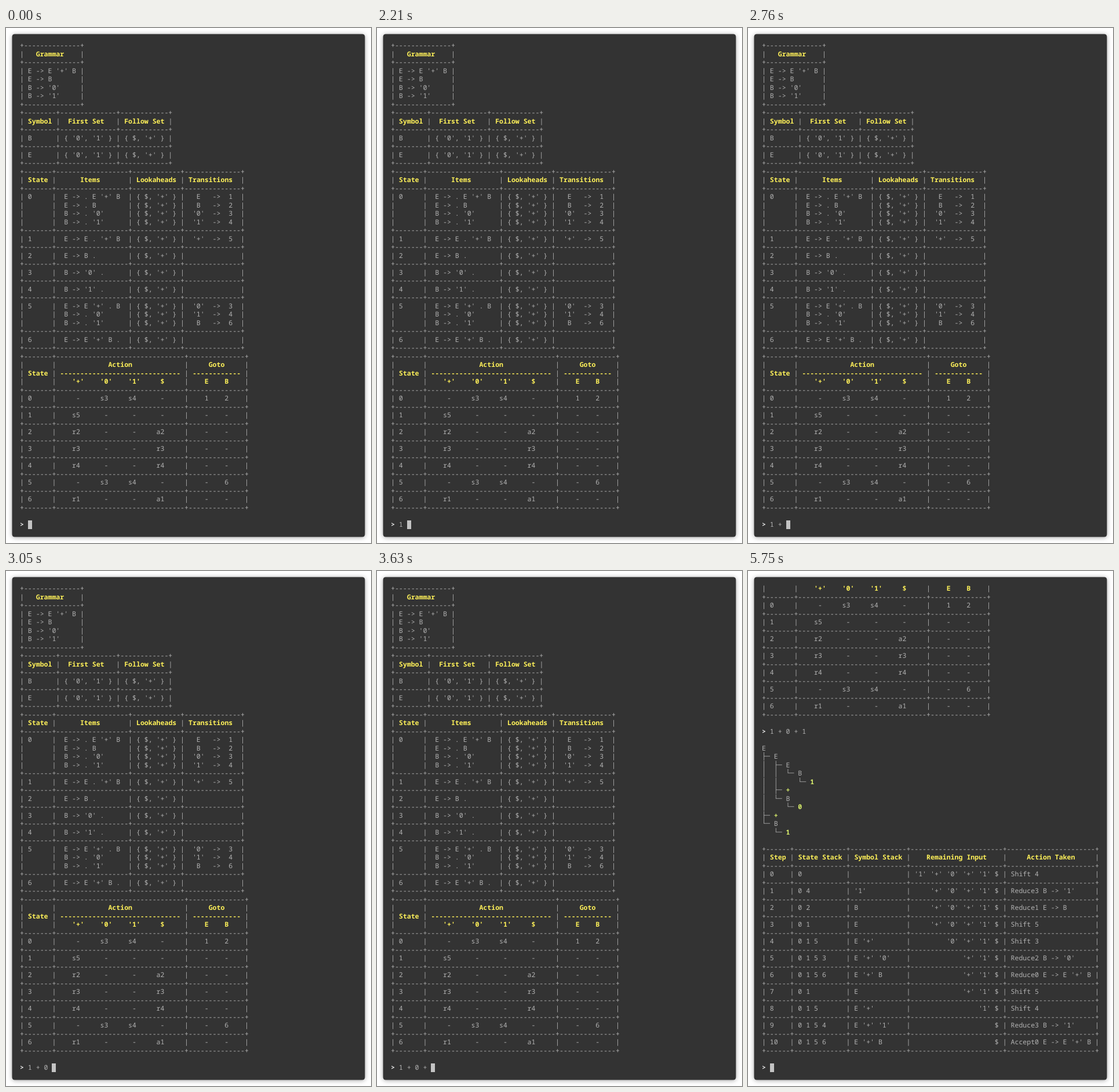
Animation, 630 px wide and 889 px high, one loop 7.75 s. Source, as an HTML page:

```html
<!DOCTYPE html>
<html lang="en">
<head>
<meta charset="utf-8">
<title>Parser tables</title>
<style>
  :root { --cw: 6.93px; --row: 14.5px; --top: 13.2px; --loop: 7750ms; }
  html, body { margin: 0; width: 100%; height: 100%; overflow: hidden; background: #fff; }
  .window {
    position: absolute; left: 11px; top: 11px; width: 608px; height: 867px;
    border-radius: 4px; background: #333;
    box-shadow: 0 0 0 .5px #333, 0 1px 8px rgba(0, 0, 0, .4);
  }
  .screen {
    position: absolute; inset: 0; color: #b2b2b2;
    font: 11.55px/var(--row) "Noto Sans Mono", "DejaVu Sans Mono", monospace;
    font-variant-ligatures: none; text-rendering: geometricPrecision;
    white-space: pre;
  }
  pre { position: absolute; left: 13px; top: var(--top); margin: 0; font: inherit; }
  b { font-weight: 700; color: #fff159; }
  .prompt { color: #e6e6e6; }
  .leaf { color: #d9ef6c; }
  .input {
    position: absolute; height: var(--row);
    left: calc(13px + 2 * var(--cw)); top: calc(var(--top) + 57 * var(--row));
  }
  .typed { position: absolute; inset: 0; overflow: hidden; }
  .cursor { position: absolute; left: 100%; top: -.7px; width: 7px; height: 15px; background: #c4c4c4; }

  .before { animation: leave var(--loop) step-end infinite; }
  .after { animation: enter var(--loop) step-end infinite; }
  .before .input { animation: type var(--loop) step-end infinite; }
  @keyframes leave { 0% { visibility: visible } 74.193%, 100% { visibility: hidden } }
  @keyframes enter { 0% { visibility: hidden } 74.193%, 100% { visibility: visible } }
  @keyframes type {
    0% { width: 0 }
    25.806% { width: var(--cw) }
    28.516% { width: calc(2 * var(--cw)) }
    32.516% { width: calc(3 * var(--cw)) }
    35.612% { width: calc(4 * var(--cw)) }
    37.29% { width: calc(5 * var(--cw)) }
    39.354% { width: calc(6 * var(--cw)) }
    43.87% { width: calc(7 * var(--cw)) }
    46.838% { width: calc(8 * var(--cw)) }
    48.387%, 100% { width: calc(9 * var(--cw)) }
  }
</style>
</head>
<body>
<div class="window">
  <div class="screen before"><pre></pre><div class="input"><span class="typed">1 + 0 + 1</span><i class="cursor"></i></div></div>
  <div class="screen after"><pre></pre><div class="input"><i class="cursor"></i></div></div>
</div>
<script>
const bold = (text, name = '') => `<b class="${name}">${text}</b>`;

// Each block is a list of rows, each row a list of cells; the first block is the heading.
function grid(widths, blocks) {
  const rule = '+' + widths.map(w => '-'.repeat(w)).join('+') + '+';
  const lines = [rule];
  blocks.forEach((rows, n) => {
    for (const row of rows) {
      const cells = widths.map((w, i) => (row[i] || '').padEnd(w));
      lines.push('|' + cells.map(c => n ? c : bold(c)).join('|') + '|');
    }
    lines.push(rule);
  });
  return lines;
}

const grammar = grid([14], [
  [['   Grammar']],
  [[" E -> E '+' B"], [' E -> B'], [" B -> '0'"], [" B -> '1'"]]
]);

const follow = " { $, '+' }";
const sets = grid([8, 14, 12], [
  [[' Symbol', '  First Set', ' Follow Set']],
  ...['B', 'E'].map(s => [[' ' + s, " { '0', '1' }", follow]])
]);

const go = (symbol, state) => (symbol.length < 2 ? `   ${symbol} ` : '  ' + symbol) + '  ->  ' + state;
const itemSets = [
  [["E -> . E '+' B", 'E', 1], ['E -> . B', 'B', 2], ["B -> . '0'", "'0'", 3], ["B -> . '1'", "'1'", 4]],
  [["E -> E . '+' B", "'+'", 5]],
  [['E -> B .']],
  [["B -> '0' ."]],
  [["B -> '1' ."]],
  [["E -> E '+' . B", "'0'", 3], ["B -> . '0'", "'1'", 4], ["B -> . '1'", 'B', 6]],
  [["E -> E '+' B ."]]
];
const states = grid([7, 18, 12, 14], [
  [[' State', '      Items', ' Lookaheads', ' Transitions']],
  ...itemSets.map((set, n) => set.map(([item, symbol, next], i) =>
    [i ? '' : ' ' + n, '  ' + item, follow, symbol ? go(symbol, next) : '']))
]);

const actionRow = (label, entries) => {
  const e = entries.split(' ');
  const acts = e.slice(0, 4).map(a => (a.length < 2 ? ' ' + a : a).padEnd(7));
  return [label, '    ' + acts.join(''), `    ${e[4]}    ${e[5]}`];
};
const actions = grid([7, 32, 14], [
  [
    ['', ' '.repeat(13) + 'Action', '     Goto'],
    [' State', ' ' + '-'.repeat(30), ' ' + '-'.repeat(12)],
    actionRow('', "'+' '0' '1' $ E B")
  ],
  ...['- s3 s4 - 1 2', 's5 - - - - -', 'r2 - - a2 - -', 'r3 - - r3 - -',
    'r4 - - r4 - -', '- s3 s4 - - 6', 'r1 - - a1 - -'].map((e, n) => [actionRow(' ' + n, e)])
]);

const tree = `E
├─ E
│  ├─ E
│  │  └─ B
│  │     └─ 1
│  ├─ +
│  └─ B
│     └─ 0
├─ +
└─ B
   └─ 1`.replace(/[01+]/g, c => bold(c, 'leaf')).split('\n');

const input = "'1' '+' '0' '+' '1' $".split(' ');
// State stack, symbol stack, tokens consumed, action
const trace = [
  ['0', '', 0, 'Shift 4'],
  ['0 4', "'1'", 1, "Reduce3 B -> '1'"],
  ['0 2', 'B', 1, 'Reduce1 E -> B'],
  ['0 1', 'E', 1, 'Shift 5'],
  ['0 1 5', "E '+'", 2, 'Shift 3'],
  ['0 1 5 3', "E '+' '0'", 3, "Reduce2 B -> '0'"],
  ['0 1 5 6', "E '+' B", 3, "Reduce0 E -> E '+' B"],
  ['0 1', 'E', 3, 'Shift 5'],
  ['0 1 5', "E '+'", 4, 'Shift 4'],
  ['0 1 5 4', "E '+' '1'", 5, "Reduce3 B -> '1'"],
  ['0 1 5 6', "E '+' B", 5, "Accept0 E -> E '+' B"]
];
const steps = grid([6, 13, 14, 23, 22], [
  [[' Step', ' State Stack', ' Symbol Stack', '    Remaining Input', '     Action Taken']],
  ...trace.map(([stack, symbols, used, action], n) =>
    [[' ' + n, ' ' + stack, ' ' + symbols, input.slice(used).join(' ').padStart(22), ' ' + action]])
]);

const prompt = bold('&gt;', 'prompt');
const show = (name, lines) => {
  document.querySelector(`.${name} pre`).innerHTML = lines.join('\n');
};
show('before', [...grammar, ...sets, ...states, ...actions, '', prompt]);
show('after', [...actions.slice(3), '', prompt + ' 1 + 0 + 1', '', ...tree, '', ...steps, '', prompt]);
</script>
</body>
</html>
```
